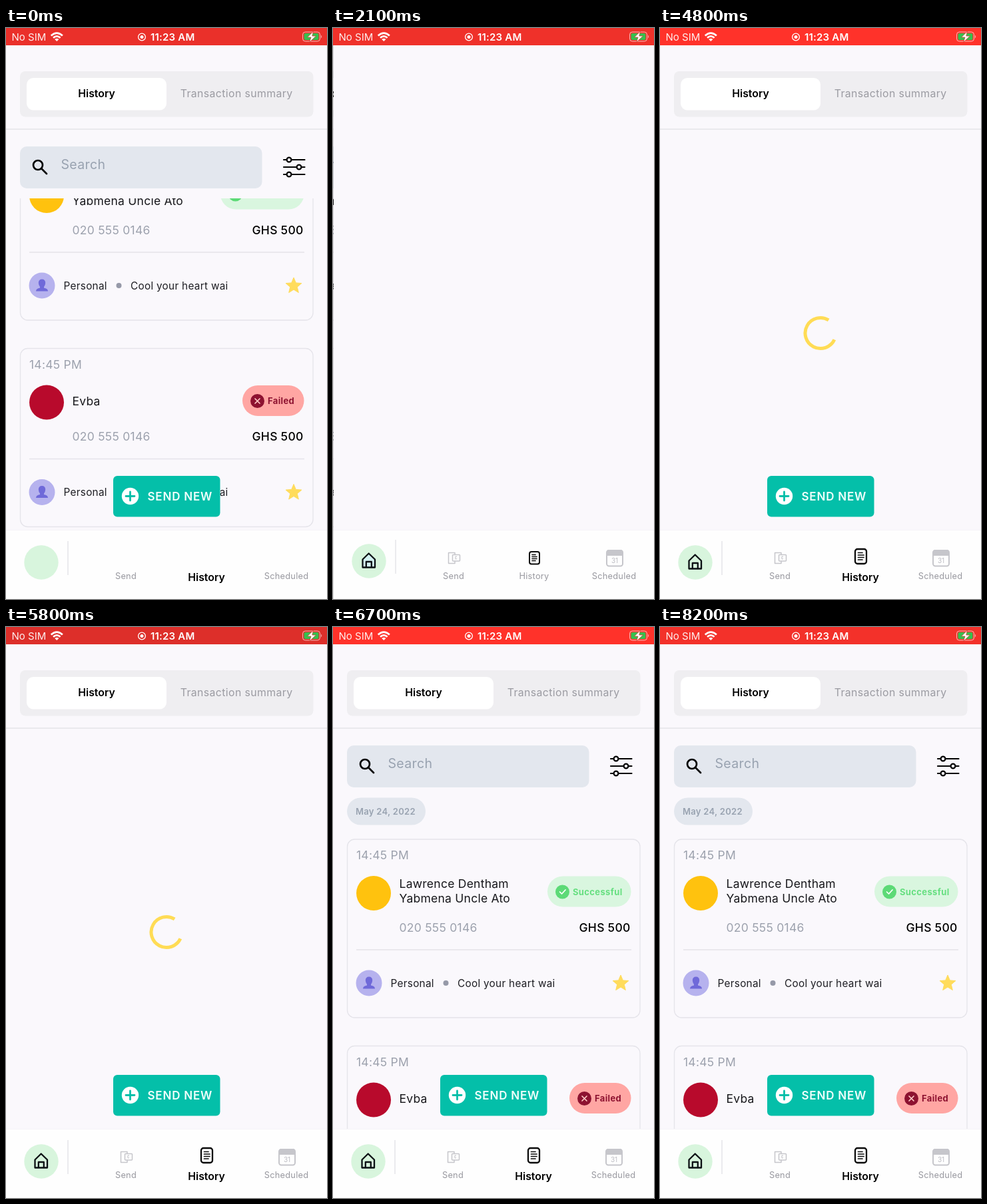
Write an HTML page that moves like this. It is 482x858 px and loops after 8.3 s.

```html
<!DOCTYPE html>
<html lang="en">
<head>
<meta charset="utf-8">
<title>Transaction history</title>
<style>
  html, body { margin: 0; width: 100%; height: 100%; overflow: hidden; background: #faf8fc; }
  svg { display: block; width: 100vw; height: 100vh; }
  text { font-family: Inter, Roboto, sans-serif; white-space: pre; }
  .body { font-size: 17.5px; letter-spacing: .25px; fill: #17171b; }
  .dim { fill: #9ca1ad; }
  .note { font-size: 15.3px; letter-spacing: .3px; fill: #1d1d22; }
  .tag { font-size: 13px; font-weight: 700; letter-spacing: .35px; }
  .tab { font-size: 15.8px; text-anchor: middle; }
  .nav { font-size: 12.8px; letter-spacing: .25px; fill: #98989f; text-anchor: middle; }
  .on { font-size: 15.8px; letter-spacing: 0; font-weight: 600; fill: #000; }
  .line { fill: none; stroke-linecap: round; stroke-linejoin: round; }
</style>
</head>
<body>
<svg id="stage" viewBox="0 0 482 858" xmlns="http://www.w3.org/2000/svg">
  <defs>
    <clipPath id="listClip"><rect y="256" width="482" height="499"/></clipPath>
    <linearGradient id="edge"><stop offset="0" stop-color="#000" stop-opacity="0"/><stop offset="1" stop-color="#000" stop-opacity=".12"/></linearGradient>
  </defs>

  <g id="history">
    <rect width="482" height="858" fill="#faf8fc"/>
    <rect x="21" y="65" width="440.500" height="68.500" rx="8" fill="#efeef1"/>
    <rect x="31" y="75" width="210" height="48.500" rx="10" fill="#fff"/>
    <text class="tab" x="136" y="104" font-weight="600">History</text>
    <text class="tab" x="346.200" y="104" fill="#9b9ba2" letter-spacing=".4">Transaction summary</text>
    <path d="M0 152H482" stroke="#e5e4e9" stroke-width="1.500"/>

    <g id="results">
      <g clip-path="url(#listClip)"><g id="list"></g></g>
      <rect x="21" y="178" width="363.500" height="63" rx="10" fill="#e3e7ee"/>
      <g class="line" stroke="#000" stroke-width="2.700">
        <circle cx="48" cy="206" r="7"/><path d="M53.500 211.500L61 219"/>
      </g>
      <text x="82.500" y="212" font-size="19.500" letter-spacing=".35" fill="#98a2b0">Search</text>
      <g class="line" stroke="#000" stroke-width="2.200" fill="none">
        <path d="M417 198H421M429 198H448.500M417 209H436M444 209H448.500M417 220H421M429 220H448.500"/>
        <circle cx="425" cy="198" r="3.400"/><circle cx="440" cy="209" r="3.400"/><circle cx="425" cy="220" r="3.400"/>
      </g>
    </g>

    <path id="spinner" class="line" style="stroke-linecap:butt" stroke="#ffdc55" stroke-width="5"/>

    <rect x="161" y="673" width="160.500" height="61.500" rx="6" fill="#04bfa9"/>
    <circle cx="186.500" cy="703.500" r="12.700" fill="#fff"/>
    <path d="M180 703.500H193M186.500 697V710" stroke="#04bfa9" stroke-width="2.800" stroke-linecap="round"/>
    <text x="212.500" y="709.500" font-size="17" font-weight="600" letter-spacing=".8" fill="#f1fffc">SEND NEW</text>
    <g id="navOn"></g>
  </g>

  <g id="blank">
    <rect x="-8" width="8" height="858" fill="url(#edge)"/>
    <rect width="482" height="858" fill="#faf8fc"/>
    <g id="navOff"></g>
  </g>

  <g id="status">
    <rect id="bar" width="482" height="26"/>
    <text x="8.500" y="19" font-size="15" fill="#fff" fill-opacity=".92">No SIM</text>
    <g class="line" stroke="#fff" stroke-width="2.700" style="stroke-linecap:butt">
      <path d="M67.700 11.500Q76.300 3.600 84.900 11.500M71 14.800Q76.300 10 81.600 14.800"/>
    </g>
    <path d="M76.300 20L73.200 16.900Q76.300 14.400 79.400 16.900Z" fill="#fff"/>
    <circle cx="204" cy="13.500" r="5.400" fill="none" stroke="#fff" stroke-width="1.300"/>
    <circle cx="204" cy="13.500" r="2.500" fill="#fff"/>
    <text x="217" y="19" font-size="15" font-weight="600" letter-spacing=".2" fill="#fff">11:23 AM</text>
    <rect x="445.500" y="6" width="26" height="14" rx="4" fill="none" stroke="#fff" stroke-opacity=".65"/>
    <rect x="447.500" y="8" width="22" height="10" rx="2" fill="#35c04f"/>
    <path d="M473 10.500Q475.400 13 473 15.500Z" fill="#fff" fill-opacity=".65"/>
    <path d="M461.500 5L452.500 14H458L455.500 21.500L465.500 12H459.800Z" fill="#fff" stroke="#c9402f" stroke-width=".8"/>
  </g>
</svg>

<script>
const LOOP = 8300, STEP = 100;
const ICONS_AT = 100, PUSH_AT = 1800, PUSH_MS = 344;
const LOAD_AT = 4400, LIST_AT = 5965;
const RISE = 200, RISE_MS = 600, STAGGER = 50;
const WIDTH = 482, SCROLLED = 148;

const $ = id => document.getElementById(id);
const clamp = v => Math.max(0, Math.min(1, v));
const rest = p => Math.pow(1 - clamp(p), 3);
const show = (el, on) => el.setAttribute('display', on ? 'inline' : 'none');
const move = (el, x, y) => el.setAttribute('transform', `translate(${x.toFixed(2)} ${y.toFixed(2)})`);

function star(cx, cy, r) {
  const pts = [];
  for (let i = 0; i < 10; i++) {
    const a = -Math.PI / 2 + i * Math.PI / 5, d = i % 2 ? r * .45 : r;
    pts.push((cx + d * Math.cos(a)).toFixed(1) + ',' + (cy + d * Math.sin(a)).toFixed(1));
  }
  return `<polygon points="${pts.join(' ')}" fill="#ffdc5c" stroke="#ffdc5c" stroke-linejoin="round"/>`;
}

function pill(ok) {
  const x = ok ? 322 : 355, cx = ok ? 344.5 : 377.5;
  const mark = ok ? `M${cx - 4} 79l3 3l5.500-6` : `M${cx - 3.5} 75.500l7 7m0-7l-7 7`;
  return `<rect x="${x}" y="55.500" width="${447.5 - x}" height="46" rx="23" fill="${ok ? '#d9f6df' : '#ffa6a3'}"/>
    <circle cx="${cx}" cy="79" r="10.500" fill="${ok ? '#5cda76' : '#8d1230'}"/>
    <path class="line" d="${mark}" stroke="${ok ? '#fff' : '#ffc9c6'}" stroke-width="1.700"/>
    <text class="tag" x="${ok ? 360 : 393}" y="83.500" fill="${ok ? '#66df80' : '#8d1230'}">${ok ? 'Successful' : 'Failed'}</text>`;
}

function card(top, names, color, ok) {
  const first = names.length > 1 ? 73 : 85;
  const title = names.map((n, i) => `<text class="body" x="99.500" y="${first + i * 22}">${n}</text>`).join('');
  const parts = [
    `<text class="body dim" x="35" y="30">14:45 PM</text>`,
    `<circle cx="61" cy="81" r="26" fill="${color}"/>${title}${pill(ok)}
     <text class="body dim" x="99.500" y="138.500">020 555 0146</text>
     <text class="body" x="446.500" y="138.500" text-anchor="end" font-weight="500" style="fill:#000">GHS 500</text>`,
    `<path d="M35 166H448" stroke="#e4e3e9" stroke-width="1.300"/>`,
    `<circle cx="54" cy="216" r="19.500" fill="#b6b2ee"/>
     <path d="M45 224.500Q45 220.500 51 219.500V218Q48.800 215 48.800 212Q49 206.500 54 206.500Q59 206.500 59.200 212Q59.200 215 57 218V219.500Q63 220.500 63 224.500Z" fill="#6f69d9"/>
     <text class="note" x="86.500" y="221.500">Personal</text>
     <circle cx="169.500" cy="216" r="4" fill="#9699a8"/>
     <text class="note" x="187" y="221.500">Cool your heart wai</text>${star(432, 216.500, 12.500)}`
  ];
  return `<g transform="translate(0 ${top})">
    <rect x="21.500" y="0" width="439.500" height="268" rx="11" fill="none" stroke="#e5e4ea" stroke-width="1.300"/>
    ${parts.map((p, i) => `<g class="part" data-order="${i}">${p}</g>`).join('')}</g>`;
}

function nav(on) {
  const d = on ? 2 : 0;
  const doc = on
    ? `<rect x="293" y="783" width="17" height="22" rx="3.500" stroke-width="2.300"/><path d="M297.500 788.500H304M297.500 792H306M297.500 795.500H306M297.500 799H304"/>`
    : `<rect x="294" y="787" width="15" height="18.500" rx="3" stroke-width="2"/><path d="M298 791.500H303M298 794.500H305M298 797.500H305M298 800.500H303"/>`;
  return `<rect y="754" width="482" height="1.500" fill="#f6f4f8"/>
    <rect y="755" width="482" height="103" fill="#fefefe"/>
    <circle cx="53" cy="${801 + d}" r="25.700" fill="#d8f5dd"/>
    <path d="M93 ${769 + d}V${820 + d}" stroke="#e5e5e9" stroke-width="1.500"/>
    <g class="icons">
      <g transform="translate(0 ${d})" class="line" stroke="#0c1014" stroke-width="2.300">
        <path d="M43.500 798.500L52.700 789.500L62 798.500V810.500H43.500Z" fill="${on ? 'none' : '#d3f1f1'}"/>
        <path d="M48.800 810V802H56.800V810"/>
      </g>
      <g class="line" stroke="#c6c6cb" stroke-width="1.500">
        <path d="M182 791V788.500H172.500V804.500H182V801.500"/><rect x="178.500" y="791.500" width="11" height="9.500" rx="1"/>
      </g>
      <text x="183.800" y="799" font-size="7" text-anchor="middle" fill="#c0c0c5">¢</text>
      <g class="line" stroke="#0a0a0a" stroke-width="1.700">${doc}</g>
      <rect x="410" y="785" width="24" height="23.500" rx="3.500" fill="#fefefe" stroke="#c6c6cb" stroke-width="2"/>
      <path d="M409.500 793V787.500Q409.500 784 413 784H431Q434.500 784 434.500 787.500V793Z" fill="#c6c6cb"/>
      <text x="422" y="803.500" font-size="10" text-anchor="middle" fill="#bdbdc3">31</text>
    </g>
    <text class="nav" x="180" y="827.500">Send</text>
    <text class="nav${on ? ' on' : ''}" x="301" y="${on ? 830.5 : 827.5}">History</text>
    <text class="nav" x="421" y="827.500">Scheduled</text>`;
}

$('list').innerHTML =
  `<rect x="21" y="256.500" width="118" height="41" rx="20.500" fill="#e3e7ee"/>
   <text x="34" y="282" font-size="13" font-weight="600" letter-spacing=".3" fill="#98a2b0">May 24, 2022</text>` +
  card(319, ['Lawrence Dentham', 'Yabmena Uncle Ato'], '#ffc20e', true) +
  card(629.5, ['Evba'], '#b80a2c', false);
$('navOn').innerHTML = nav(true);
$('navOff').innerHTML = nav(false);
const parts = [...document.querySelectorAll('.part')];
const icons = $('navOn').querySelector('.icons');

function spin(t) {
  const at = deg => {
    const a = deg * Math.PI / 180;
    return (241 + 23 * Math.cos(a)).toFixed(2) + ' ' + (458.5 + 23 * Math.sin(a)).toFixed(2);
  };
  const from = 25 + (t - 4800) * .36;
  $('spinner').setAttribute('d', `M${at(from)}A23 23 0 1 1 ${at(from + 277)}`);
}

function render(t) {
  const opening = t < PUSH_AT + PUSH_MS;
  const push = (t - PUSH_AT) / PUSH_MS;
  const x = opening ? WIDTH * rest(push) : 0;
  const listed = opening || t >= LIST_AT;

  show($('history'), opening || t >= LOAD_AT);
  move($('history'), opening ? -.3 * (WIDTH - x) : 0, 0);
  show($('blank'), t >= PUSH_AT && t < LOAD_AT);
  move($('blank'), x, 0);
  show(icons, t >= ICONS_AT);

  show($('results'), listed);
  move($('list'), 0, opening ? -SCROLLED : 0);
  for (const p of parts) {
    const start = LIST_AT + p.dataset.order * STAGGER;
    move(p, 0, opening ? 0 : RISE * rest((t - start) / RISE_MS));
  }

  show($('spinner'), !listed);
  spin(t);

  // Recording bar breathes every two seconds.
  const glow = Math.pow(Math.abs(Math.sin(Math.PI * (t + 250) / 2000)), .85);
  $('bar').setAttribute('fill', `rgb(${Math.round(217 + 38 * glow)},${Math.round(47 + 3 * glow)},42)`);
}

const born = performance.now();
function tick() {
  const t = (performance.now() - born) % LOOP;
  render(Math.floor(t / STEP) * STEP);
  requestAnimationFrame(tick);
}
render(0);
requestAnimationFrame(tick);
</script>
</body>
</html>
```
